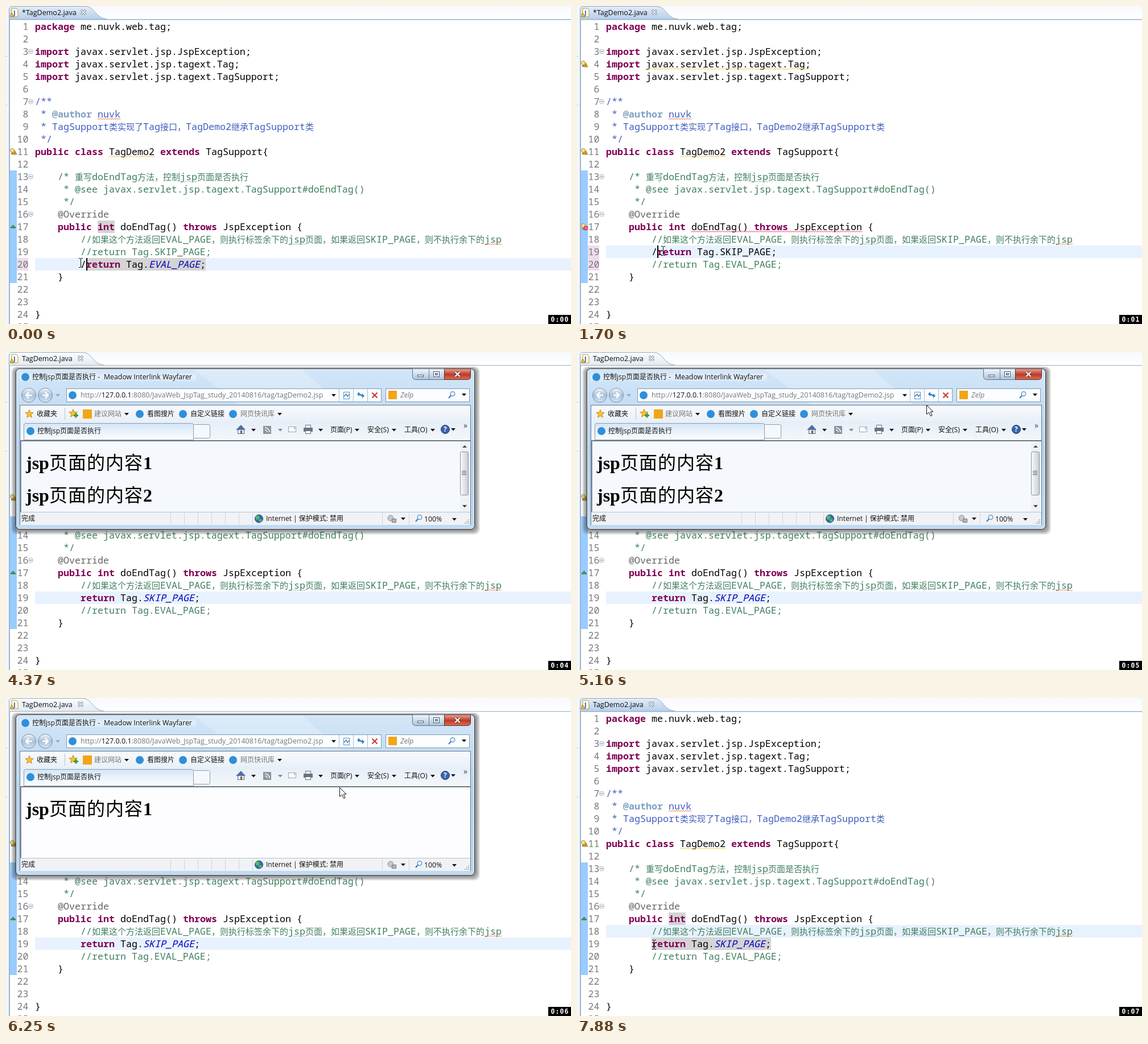
An HTML page with a canvas that plays this animation: 993 by 559 pixels, repeating every 8 s.

```html
<!DOCTYPE html>
<html lang="zh">
<head>
<meta charset="utf-8">
<title>Tag demo</title>
<style>
html, body { margin: 0; width: 100%; height: 100%; overflow: hidden; background: #fff; }
canvas { display: block; }
</style>
</head>
<body>
<canvas id="stage" width="993" height="559"></canvas>
<script>
(() => {
const c = document.getElementById('stage').getContext('2d');
const LOOP = 8000;
const MONO = '"Noto Sans Mono", "DejaVu Sans Mono", monospace';
const CJK = '"Noto Sans CJK SC", "Noto Sans CJK", sans-serif';
const UI = '"Open Sans", "Noto Sans", ' + CJK;

// Code styles: [colour, font prefix]
const N = ['#000', ''], K = ['#7f0055', 'bold '], C = ['#3f7f5f', ''], D = ['#3f5fbf', ''],
      A = ['#7f9fbf', 'bold '], G = ['#646464', ''], I = ['#0000c0', 'italic '];

const CODE = {
  1: [K, 'package', N, ' me.nuvk.web.tag;'],
  3: [K, 'import', N, ' javax.servlet.jsp.JspException;'],
  4: [K, 'import', N, ' javax.servlet.jsp.tagext.Tag;'],
  5: [K, 'import', N, ' javax.servlet.jsp.tagext.TagSupport;'],
  7: [D, '/**'],
  8: [D, ' * ', A, '@author', D, ' nuvk'],
  9: [D, ' * TagSupport类实现了Tag接口，TagDemo2继承TagSupport类'],
  10: [D, ' */'],
  11: [K, 'public class', N, ' TagDemo2 ', K, 'extends', N, ' TagSupport{'],
  13: [C, '    /* 重写doEndTag方法，控制jsp页面是否执行'],
  14: [C, '     * @see javax.servlet.jsp.tagext.TagSupport#doEndTag()'],
  15: [C, '     */'],
  16: [G, '    @Override'],
  17: [K, '    public int', N, ' doEndTag() ', K, 'throws', N, ' JspException {'],
  18: [C, '        //如果这个方法返回EVAL_PAGE，则执行标签余下的jsp页面，如果返回SKIP_PAGE，则不执行余下的jsp'],
  21: [N, '    }'],
  24: [N, '}']
};
const PAD = '        ';
// Caret visibility: [from, to, x, line]
const CARETS = [[0, 120, 141, 20], [120, 620, 151, 20], [620, 1430, 151, 19],
  [1700, 1830, 141, 19], [1830, 2370, 131, 19], [2930, 3450, 131, 19]];
const TICKS = [1000, 2100, 3070, 4100, 5060, 6150, 7130];
// Pointer path: [time, x, y]
const PATH = [[0, 131, 451], [120, 131, 451], [600, 151, 430], [2920, 151, 430], [3500, 300, 580],
  [4500, 480, 580], [5060, 610, 100], [5250, 625, 75], [5850, 625, 75], [6120, 586, 157],
  [6250, 586, 157], [6900, 862, 408], [7300, 862, 408], [7500, 600, 440], [7650, 300, 452],
  [7870, 135, 433], [LOOP, 135, 433]];

const rowTop = n => 25 + 22 * (n - 1);

function box(x, y, w, h, fill, stroke) {
  if (fill) { c.fillStyle = fill; c.fillRect(x, y, w, h); }
  if (stroke) { c.strokeStyle = stroke; c.lineWidth = 1; c.strokeRect(x + .5, y + .5, w - 1, h - 1); }
}

function disc(x, y, r, fill, stroke) {
  c.beginPath();
  c.arc(x, y, r, 0, 7);
  if (fill) { c.fillStyle = fill; c.fill(); }
  if (stroke) { c.strokeStyle = stroke; c.lineWidth = 1; c.stroke(); }
}

function poly(pts, fill, stroke, width = 1) {
  c.beginPath();
  for (let i = 0; i < pts.length; i += 2) c.lineTo(pts[i], pts[i + 1]);
  if (fill) { c.closePath(); c.fillStyle = fill; c.fill(); }
  if (stroke) { c.strokeStyle = stroke; c.lineWidth = width; c.stroke(); }
}

function rounded(x, y, w, h, r, fill, stroke) {
  c.beginPath();
  c.roundRect(x, y, w, h, r);
  if (fill) { c.fillStyle = fill; c.fill(); }
  if (stroke) { c.strokeStyle = stroke; c.lineWidth = 1; c.stroke(); }
}

function grad(y0, y1, ...stops) {
  const g = c.createLinearGradient(0, y0, 0, y1);
  stops.forEach((s, i) => g.addColorStop(i / (stops.length - 1), s));
  return g;
}

function cross(x, y, r, color, width) {
  poly([x - r, y - r, x + r, y + r], null, color, width);
  poly([x + r, y - r, x - r, y + r], null, color, width);
}

const drop = (x, y, color = '#111') => poly([x - 4, y - 2, x + 4, y - 2, x, y + 2.5], color);

function label(s, x, y, color = '#111', font = '12.3px ' + UI) {
  c.font = font;
  c.fillStyle = color;
  c.fillText(s, x, y);
}

// Mixed text with fixed advances for wide glyphs; returns the end position.
function mixed(s, x, y, font, wideFont, wide, latin) {
  for (const run of s.match(/[\u2e80-\uffff]+|[^\u2e80-\uffff]+/g)) {
    if (run > '\u2e80') {
      c.font = wideFont;
      for (const ch of run) { c.fillText(ch, x, y); x += wide; }
    } else {
      c.font = font;
      c.fillText(run, x, y);
      x += latin ? run.length * latin : c.measureText(run).width;
    }
  }
  return x;
}

function codeLine(n, parts) {
  let x = 51;
  for (let i = 0; i < parts.length; i += 2) {
    const [color, style] = parts[i];
    c.fillStyle = color;
    x = mixed(parts[i + 1], x, rowTop(n) + 17, style + '16.667px ' + MONO, '300 15px ' + CJK, 15, 10);
  }
}

function squiggle(n, x0, x1, color) {
  const pts = [];
  for (let x = x0, up = 0; x <= x1; x += 2, up ^= 1) pts.push(x, rowTop(n) + 20.5 - 2 * up);
  poly(pts, null, color);
}

function bulb(n, error) {
  const y = rowTop(n) + 10;
  disc(11, y - 1, 3.5, '#fbe08a', '#c08a20');
  box(9, y + 3, 4, 3, '#8a8a8a');
  if (error) {
    box(12, y, 7, 7, '#d8323c');
    cross(15.5, y + 3.5, 2, '#fff', 1);
  } else {
    poly([15.5, y - 1, 19, y + 6, 12, y + 6], '#f6c136', '#b07a10');
    box(15, y + 2, 1, 3, '#5a3a00');
  }
}

const checker = (() => {
  const p = document.createElement('canvas');
  p.width = p.height = 2;
  const g = p.getContext('2d');
  g.fillStyle = '#fff';
  g.fillRect(0, 0, 2, 2);
  g.fillStyle = '#3399ff';
  g.fillRect(0, 0, 1, 1);
  g.fillRect(1, 1, 1, 1);
  return c.createPattern(p, 'repeat');
})();

function editorTab(active, dirty) {
  const dx = dirty ? 5 : 0;
  box(0, 0, 993, 23, grad(0, 23, '#f7f9fc', '#fff'));
  box(0, 0, 5, 559, '#f4f6f8');
  box(0, 88, 2, 1, '#a8b4c4');
  box(0, 174, 2, 1, '#a8b4c4');
  c.beginPath();
  c.moveTo(5.5, 24);
  c.lineTo(5.5, 5);
  c.quadraticCurveTo(6, .5, 11, .5);
  c.lineTo(134 + dx, .5);
  c.bezierCurveTo(152 + dx, .5, 152 + dx, 22, 172 + dx, 23);
  c.fillStyle = active ? grad(0, 24, '#e6eefa', '#b4cdea') : grad(0, 24, '#fbfcfe', '#e3eaf2');
  c.fill();
  c.strokeStyle = '#8fa9c8';
  c.lineWidth = 1;
  c.stroke();
  box(5, 23, 988, 1, '#93aecb');
  if (active) box(5, 24, 988, 1, '#c9daee');
  box(5, 24, 2, 535, '#99b4d1');

  poly([10, 4, 18, 4, 21, 7, 21, 19, 10, 19], '#fffbe8', '#b59a55');
  label('J', 13, 16, '#2f5f9f', 'bold 11px ' + UI);
  poly([10, 12, 14, 19, 7, 19], '#f6c136', '#b07a10');
  label((dirty ? '*' : '') + 'TagDemo2.java', 28, 16, '#111', '12.5px ' + UI);
  const x = 131 + dx;
  cross(x, 11, 4, '#7d8794', 3.5);
  cross(x, 11, 3.7, '#fff', 1.6);
}

function editor(t, covered) {
  const dirty = t < 3070, problems = t >= 380 && t < 2800;
  const current = t < 620 ? 20 : t < 7000 ? 19 : 18;
  const pale = t >= 5600 && t < 6250;
  box(0, 0, 993, 559, '#fff');
  editorTab(!covered, dirty);
  box(7, 289, 12, 198, checker);
  box(pale ? 988 : 51, rowTop(current), 942, 22, '#e8f2fe');

  if (dirty) box(19, rowTop(20), 20, 22, '#eddcee');
  if (dirty && t >= 1700) box(19, rowTop(19), 20, 22, '#eddcee');
  if ((t < 120 || t >= 2930) && !covered) {
    box(161, rowTop(17), 30, 22, '#d4d4d4');
    if (t < 120) box(141, rowTop(20), 210, 22, '#d4d4d4');
    else box(131, rowTop(19), 210, 22, '#d4d4d4');
  }

  c.textAlign = 'right';
  for (let n = 1; n <= 25; n++) label(n, 39.5, rowTop(n) + 17, '#787878', '16.667px ' + MONO);
  c.textAlign = 'left';
  for (const n of [3, 7, 13, 16]) {
    disc(43.5, rowTop(n) + 11, 4, '#f4f8fc', '#a9bbd0');
    box(41, rowTop(n) + 10.5, 5, 1, '#7088a8');
  }

  for (const n in CODE) codeLine(+n, CODE[n]);
  codeLine(19, t < 1700 ? [C, PAD + '//return Tag.SKIP_PAGE;']
    : t < 1830 ? [N, PAD + '/', K, 'return', N, ' Tag.SKIP_PAGE;']
    : t < 2800 ? [K, PAD + 'return', N, ' Tag.SKIP_PAGE;']
    : [K, PAD + 'return', N, ' Tag.', I, 'SKIP_PAGE', N, ';']);
  codeLine(20, t < 120 ? [N, PAD + '/', K, 'return', N, ' Tag.', I, 'EVAL_PAGE', N, ';']
    : [C, PAD + '//return Tag.EVAL_PAGE;']);

  squiggle(8, 161, 201, '#f0603c');
  squiggle(11, 181, 261, '#f2c230');
  squiggle(13, 306, 336, '#9db4ac');
  squiggle(18, 497, 527, '#8fb0c0');
  squiggle(18, 841, 871, '#f07040');
  bulb(11, false);
  if (problems) {
    bulb(4, false);
    bulb(17, true);
    squiggle(4, 121, 411, '#f2c230');
    squiggle(17, 201, 501, '#f0286c');
  } else {
    poly([12.5, 385, 17, 390, 8, 390], '#4fa050', '#2f6f34');
  }
  for (const [a, b, x, n] of CARETS) if (t >= a && t < b) box(x, rowTop(n), 2, 22, '#000');
}

const site = (x, y, r = 7) => disc(x, y, r, '#2f8fd8');

function star(x, y) {
  const pts = [];
  for (let i = 0; i < 10; i++) {
    const r = i % 2 ? 3.2 : 7.5, a = i * Math.PI / 5;
    pts.push(x + r * Math.sin(a), y - r * Math.cos(a));
  }
  poly(pts, '#fbc32d', '#c88a14');
}

function lens(x, y, color) {
  disc(x + 1, y - 1.5, 4, '#e6f2fc', color);
  poly([x - 2, y + 1.5, x - 6, y + 6], null, color, 2);
}

function windowFrame() {
  for (let i = 9; i > 0; i--) rounded(18 - i, 30 - i / 2, 806 + 2 * i, 282 + 1.5 * i, 9, 'rgba(50,50,55,.085)');
  rounded(17.5, 29.5, 806, 282, 7, grad(29, 312, '#d3e6f8', '#b4d3ee', '#bfdaf2'), '#28343f');
  rounded(18.5, 30.5, 804, 280, 6, null, 'rgba(255,255,255,.75)');
  poly([330, 31, 520, 31, 590, 92, 410, 92], 'rgba(255,255,255,.22)');
  box(24, 36, 310, 16, grad(36, 52, 'rgba(255,255,255,.1)', 'rgba(255,255,255,.45)', 'rgba(255,255,255,.1)'));

  rounded(714.5, 29.5, 56, 19, [0, 0, 0, 5], grad(30, 49, '#eef5fb', '#a9c3dc'), '#5d7084');
  rounded(770.5, 29.5, 46, 19, [0, 0, 5, 0], grad(30, 49, '#e6a292', '#bd3a28', '#d8735c'), '#5c2a26');
  box(743, 30, 1, 18, '#6d8095');
  box(723, 40, 11, 4, '#fff', '#4a5866');
  box(751, 34, 11, 10, '#fff', '#4a5866');
  box(754, 37, 5, 4, '#a9c3dc', '#4a5866');
  cross(793.5, 39, 4, '#5a3030', 4);
  cross(793.5, 39, 4, '#fff', 2.4);
  site(34, 44);
  label('控制jsp页面是否执行 - ', 46, 48, '#111', '12px ' + UI);
  label('Meadow Interlink Wayfarer', 172, 48);
}

function navRow(hover) {
  for (const x of [40, 69]) {
    disc(x, 76, 12.5, grad(63, 89, '#f4f8fc', '#a9c0d8', '#d6e6f4'), '#7890a8');
    const d = x === 40 ? 1 : -1;
    poly([x, 71, x - 5 * d, 76, x, 81], null, '#fff', 2.5);
    poly([x - 5, 76, x + 6, 76], null, '#fff', 2.5);
  }
  drop(91, 76, '#93a9c0');
  box(106, 64, 554, 24, '#fbfdff', '#8299b2');
  for (const x of [585, 610, 635]) box(x, 65, 1, 22, '#a9bccf');
  if (hover) box(611, 65, 24, 22, grad(65, 87, '#d9effc', '#8fcaf0'));
  site(117, 76);
  const font = '12.5px ' + UI;
  let x = 131;
  for (const [s, color] of [['http://', '#777'], ['127.0.0.1', '#111'],
    [':8080/JavaWeb_JspTag_study_20140816/tag/tagDemo2.jsp', '#777']]) {
    label(s, x, 80, color, font);
    x += c.measureText(s).width;
  }
  drop(576, 76);
  box(593, 70, 11, 13, '#fff', '#5d8fc0');
  poly([594, 78, 598, 74, 600, 78, 603, 75], null, '#3f7fbf', 1.5);
  poly([617, 74, 621, 70, 621, 73, 624, 74, 624, 76, 621, 76, 621, 78], '#2f7fc8');
  poly([630, 77, 626, 81, 626, 78, 623, 77, 623, 75, 626, 75, 626, 73], '#2f7fc8');
  cross(648, 76, 4.5, '#d03a34', 2.2);
  box(667, 64, 148, 24, '#fbfdff', '#8299b2');
  box(672, 68, 15, 15, '#f2a516');
  label('Zelp', 693, 80, '#777', 'italic 12.5px ' + UI);
  lens(784, 75, '#2f78c0');
  drop(805, 75);
}

function favourites() {
  box(24, 93, 793, 211, '#eff4fa', '#66788c');
  box(25, 94, 791, 28, grad(94, 122, '#f8fafd', '#e9f0f8'));
  star(41, 109);
  label('收藏夹', 54, 113, '#111', '12px ' + UI);
  box(103, 98, 1, 21, '#b8c5d4');
  star(118, 108);
  box(119, 110, 8, 3, '#38a048');
  box(121.5, 107.5, 3, 8, '#38a048');
  box(135, 101, 16, 16, '#f2a516');
  for (const [s, x, color] of [['建议网站', 155, '#777'], ['看图搜片', 248, '#111'],
    ['自定义链接', 324, '#111'], ['网页快讯库', 412, '#777']]) {
    label(s, x, 113, color, '12px ' + UI);
    if (x > 200) site(x - 13, 109);
  }
  drop(212, 109);
  drop(481, 109);
}

function tabRow() {
  box(25, 122, 791, 33, grad(122, 155, '#e6eef7', '#f3f7fb'));
  rounded(31.5, 125.5, 298, 29, [3, 3, 0, 0], grad(126, 154, '#d3e6f8', '#eaf3fb', '#fafcfe'), '#8c9db0');
  rounded(329.5, 127.5, 29, 24, 2, '#f5f8fc', '#8c9db0');
  site(43, 139);
  label('控制jsp页面是否执行', 55, 143, '#111', '12px ' + UI);
  poly([404, 137, 413, 128, 421, 137], '#4f6fa8');
  box(407, 136, 12, 8, '#e6edf5', '#4f6fa8');
  box(412, 138, 3, 6, '#8a5a30');
  drop(435, 137);
  box(452, 130, 14, 14, '#8d939b');
  for (const r of [4, 8]) {
    c.beginPath();
    c.arc(455, 141, r, -Math.PI / 2, 0);
    c.strokeStyle = '#fff';
    c.lineWidth = 1.5;
    c.stroke();
  }
  drop(482, 137, '#888');
  box(496, 131, 14, 10, '#fff', '#9aa4b0');
  box(506, 133, 2, 2, '#d08080');
  box(526, 128, 10, 6, '#fff', '#67727e');
  box(523, 133, 16, 7, '#69747f');
  box(526, 138, 10, 6, '#fff', '#67727e');
  drop(553, 137);
  for (const [s, x, d] of [['页面(P)', 570, 617], ['安全(S)', 635, 682], ['工具(O)', 700, 750]]) {
    label(s, x, 141, '#111', '12px ' + UI);
    drop(d, 137);
  }
  disc(772, 136, 7.5, '#3a62ac', '#24407a');
  label('?', 769, 140, '#fff', 'bold 12px ' + UI);
  drop(786, 136);
  label('»', 804, 134, '#29476f', '14px ' + UI);
}

function page(fresh) {
  box(25, 155, 791, 126, fresh ? '#fdfdff' : '#f5f9fd');
  box(25, 155, 791, 2, '#6f7883');
  box(25, 155, 2, 126, '#858e98');
  c.fillStyle = '#000';
  const heading = (s, y) => mixed(s, 35, y, 'bold 32px "Liberation Serif", "Noto Serif", serif', '500 32px ' + CJK, 33);
  heading('jsp页面的内容1', 206);
  if (fresh) return;
  heading('jsp页面的内容2', 263);
  box(798, 157, 16, 124, '#eef1f5');
  poly([802, 168, 810, 168, 806, 164], '#444');
  drop(806, 271, '#444');
  const g = c.createLinearGradient(798, 0, 813, 0);
  g.addColorStop(0, '#fafbfc');
  g.addColorStop(1, '#c6ccd4');
  rounded(798.5, 175.5, 14, 76, 2, g, '#8b949e');
  for (const y of [209, 212, 215]) box(801, y, 8, 1, '#555');
}

function statusBar(loading) {
  box(25, 281, 791, 23, '#f0f2f6');
  box(25, 281, 791, 1, '#b9c2cc');
  for (let x = 289; x <= 433; x += 24) box(x, 283, 1, 20, '#cdd3da');
  for (const x of [661, 708]) box(x, 283, 1, 20, '#cdd3da');
  if (loading) {
    c.save();
    c.beginPath();
    c.rect(25, 282, 163, 22);
    c.clip();
    label('等待 http://127.0.0.1:8080/JavaWeb', 27, 297, '#111', '12px ' + UI);
    c.restore();
    rounded(193.5, 286.5, 93, 14, 2, grad(286, 301, '#f4f4f4', '#c9c9c9', '#e6e6e6'), '#9a9a9a');
    box(194, 287, 24, 13, grad(287, 300, '#a8f0ac', '#12c022', '#3fd84a'));
  } else {
    label('完成', 27, 297, '#111', '12px ' + UI);
  }
  disc(444.5, 293, 7, '#2a6fb8', '#245080');
  disc(442, 291, 3.5, '#5cb85c');
  disc(447, 296, 2.5, '#5cb85c');
  label('Internet | 保护模式: 禁用', 457, 297, '#111', '12px ' + UI);
  disc(676, 292, 5, '#c4c9cf', '#8b929a');
  box(678, 293, 8, 7, '#b0b5bb', '#777');
  drop(698, 293);
  lens(726, 292, '#2f78c0');
  label('100%', 735, 298);
  drop(788, 294);
  for (let i = 0; i < 3; i++) for (let j = 0; j <= i; j++) box(806 + 3 * i, 300 - 3 * j, 2, 2, '#b4bcc6');
}

function browser(t) {
  windowFrame();
  navRow(t >= 5200 && t < 5980);
  favourites();
  tabRow();
  page(t >= 5600);
  statusBar(t >= 5450 && t < 5980);
}

function pointer(t, covered) {
  const q = Math.floor(t / 125) * 125;
  const i = PATH.findIndex(p => p[0] > q);
  const [t0, x0, y0] = PATH[i - 1], [t1, x1, y1] = PATH[i];
  const k = (q - t0) / (t1 - t0), e = k * k * (3 - 2 * k);
  const x = Math.round(x0 + (x1 - x0) * e), y = Math.round(y0 + (y1 - y0) * e);
  if (covered && y < 312) {
    const shape = [0, 0, 0, 16, 4, 12.5, 7, 19, 9.5, 18, 6.8, 11.5, 11.5, 11.5, 0, 0];
    poly(shape.map((v, j) => v + (j % 2 ? y : x) + .5), '#fff', '#111');
  } else {
    box(x, y - 7, 1, 15, '#111');
    for (const dy of [-8, 8]) {
      box(x - 3, y + dy, 3, 1, '#111');
      box(x + 1, y + dy, 3, 1, '#111');
    }
  }
}

function clock(t) {
  const text = '0:0' + TICKS.filter(k => t >= k).length;
  box(953, 543, 40, 16, '#000');
  c.textAlign = 'center';
  [...text].forEach((ch, i) => label(ch, 961 + 8 * i, 554.5, '#fff', 'bold 11.5px "DejaVu Sans Mono", monospace'));
  c.textAlign = 'left';
}

function draw(t) {
  const covered = t >= 4100 && t < 7000;
  editor(t, covered);
  if (covered) {
    const step = Math.min(2, Math.floor((t - 4100) / 130));
    const s = [.92, .98, 1][step];
    c.save();
    c.globalAlpha = [.4, .85, 1][step];
    c.translate(420, 170);
    c.scale(s, s);
    c.translate(-420, -170);
    browser(t);
    c.restore();
  }
  pointer(t, covered);
  clock(t);
}

const start = performance.now();
function tick() {
  draw(Math.max(0, performance.now() - start) % LOOP);
  requestAnimationFrame(tick);
}
tick();
})();
</script>
</body>
</html>
```
